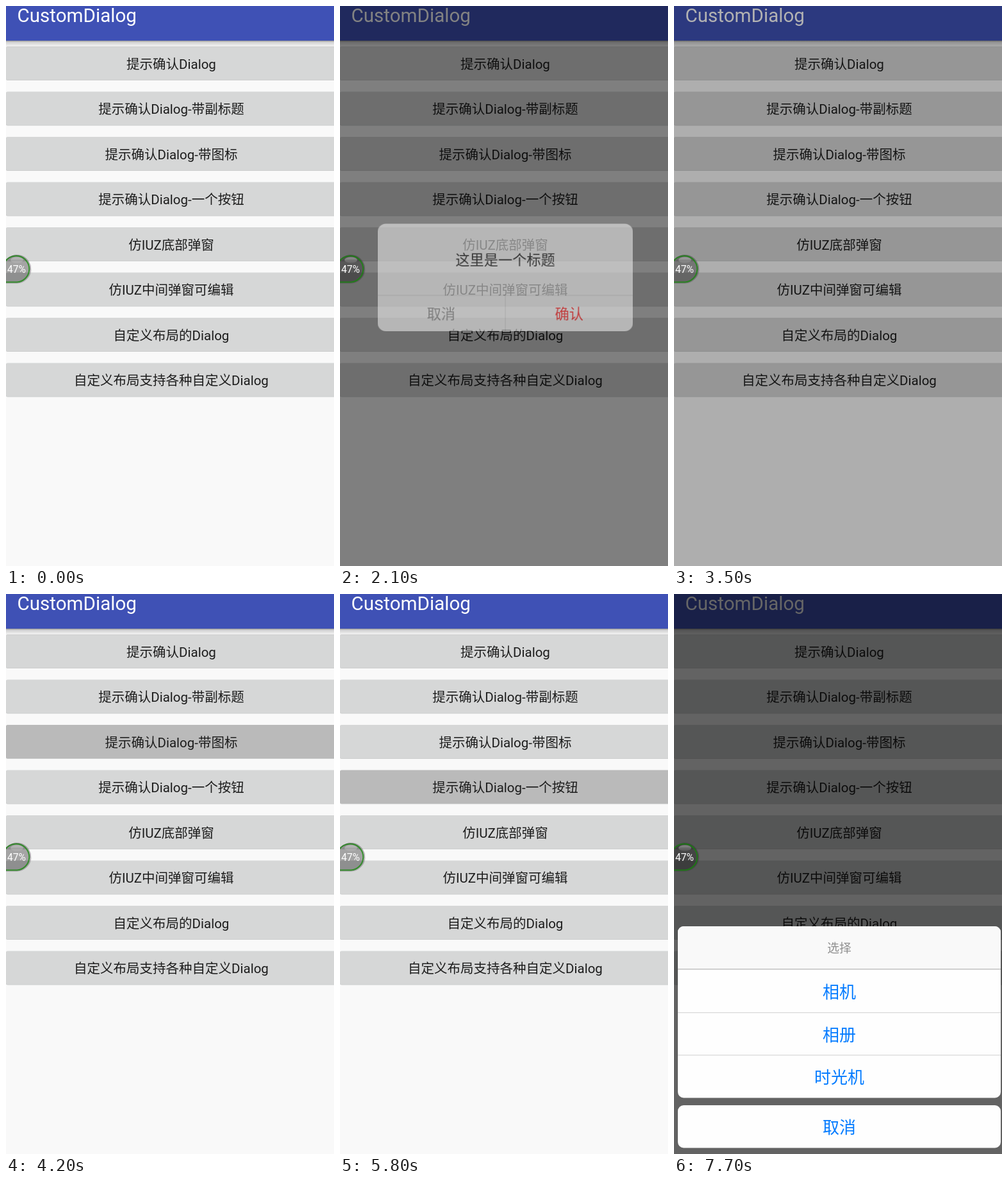
An HTML page that plays this animation: 512 by 873 pixels, repeating every 8 s.

```html
<!DOCTYPE html>
<html lang="zh-CN">
<head>
<meta charset="utf-8">
<title>CustomDialog</title>
<style>
  html, body { margin: 0; width: 100%; height: 100%; overflow: hidden; background: #f9f9f9; }
  svg { display: block; width: 512px; height: 873px; }
  text { font-family: Roboto, "Noto Sans CJK SC", "Noto Sans CJK", sans-serif; }
  .dialog { transform-origin: 258px 423px; }
</style>
</head>
<body>
<svg id="stage" viewBox="0 0 512 873">
  <defs>
    <linearGradient id="shade" x1="0" y1="0" x2="0" y2="1">
      <stop offset="0" stop-opacity=".42"/>
      <stop offset=".2" stop-opacity=".16"/>
      <stop offset=".7" stop-opacity=".05"/>
      <stop offset="1" stop-opacity="0"/>
    </linearGradient>
    <linearGradient id="gloss" x1="0" y1="0" x2="0" y2="1">
      <stop offset="0" stop-color="#fff" stop-opacity=".4"/>
      <stop offset="1" stop-color="#fff" stop-opacity=".08"/>
    </linearGradient>
  </defs>
</svg>
<script>
const LOOP = 8000;
const MID = 258;
const stage = document.getElementById('stage');

function add(parent, tag, attrs, content) {
  const el = document.createElementNS('http://www.w3.org/2000/svg', tag);
  for (const key in attrs) el.setAttribute(key, attrs[key]);
  if (content) el.textContent = content;
  return parent.appendChild(el);
}

function rect(parent, x, y, width, height, fill, rx = 0) {
  return add(parent, 'rect', { x, y, width, height, fill, rx });
}

// Text centred on (x, y)
function label(parent, content, x, y, size, fill) {
  return add(parent, 'text',
    { x, y: y + size * 0.37, 'font-size': size, fill, 'text-anchor': 'middle' }, content);
}

// Held values: rows of [time, css properties]
function track(el, rows) {
  const frames = rows.map(([time, props]) => ({ offset: time / LOOP, easing: 'steps(1)', ...props }));
  frames.push({ ...frames[frames.length - 1], offset: 1 });
  el.animate(frames, { duration: LOOP, iterations: Infinity });
}

// Page
rect(stage, 0, 0, 512, 873, '#f9f9f9');
const buttons = [
  '提示确认Dialog', '提示确认Dialog-带副标题', '提示确认Dialog-带图标', '提示确认Dialog-一个按钮',
  '仿IUZ底部弹窗', '仿IUZ中间弹窗可编辑', '自定义布局的Dialog', '自定义布局支持各种自定义Dialog'
].map((content, i) => {
  const y = 63 + i * 70.5;
  rect(stage, 0, y + 0.6, 516, 52.5, '#c9caca', 2.5);
  const face = rect(stage, 0, y, 516, 52.3, '#d6d7d7', 2.5);
  label(stage, content, MID, y + 27, 20.5, '#1c1c1c');
  return face;
});
rect(stage, 0, 54, 512, 11, 'url(#shade)');
rect(stage, 0, 0, 512, 54, '#3f51b5');
add(stage, 'text', { x: 17.5, y: 25, 'font-size': 29.6, fill: '#fff' }, 'CustomDialog');

for (const [i, time] of [[0, 700], [2, 4200], [3, 5800], [4, 7400]]) {
  track(buttons[i], [[0, { fill: '#d6d7d7' }], [time, { fill: '#bababa' }], [time + 100, { fill: '#d6d7d7' }]]);
}

const dim = rect(stage, 0, 0, 512, 873, '#000');
const dimRows = [[0, { opacity: 0 }]];
const fadeDim = (time, levels) =>
  levels.forEach((opacity, i) => dimRows.push([time + i * 100, { opacity }]));

// Centre dialogs
function dialog({ open, close, quick, title = '#000', subtitle, single }) {
  const g = add(stage, 'g', { class: 'dialog' });
  rect(g, 47, 334.5, 422, 177.5, '#f9f9f9', 14);
  label(g, '这里是一个标题', MID, subtitle ? 378.5 : 394, 23.5, title);
  if (subtitle) label(g, subtitle, MID, 423, 20.5, '#808080');
  rect(g, 47, 452, 422, 1.3, '#dcdcdc');
  if (single) {
    label(g, '取消', MID, 483, 23.5, '#f00');
  } else {
    rect(g, 257.4, 452, 1.3, 60, '#dcdcdc');
    label(g, '取消', 152, 483, 23.5, '#808080');
    label(g, '确认', 363.5, 483, 23.5, '#f00');
  }

  const pose = (opacity, scale) => ({ opacity, transform: `scale(${scale})` });
  const rows = [[0, pose(0, 1)], [open, pose(0.93, 0.99)], [open + 100, pose(1, 1)]];
  if (!quick) rows.push([close, pose(0.52, 0.945)]);
  rows.push([quick ? close : close + 100, pose(0, 0.9)]);
  track(g, rows);
  fadeDim(open, [0.22, 0.47, 0.6]);
  fadeDim(close, quick ? [0.3, 0] : [0.49, 0.2, 0]);
}

dialog({ open: 800, close: 2100 });
dialog({ open: 2900, close: 3500, quick: true, subtitle: '这是一个副标题' });
dialog({ open: 4300, close: 5000 });
dialog({ open: 5900, close: 6700, title: '#7e7488', single: true });

// Bottom sheet
const sheet = add(stage, 'g', {});
rect(sheet, 6, 518, 504, 267.5, '#fefefe', 9);
add(sheet, 'path', { d: 'M6 585V527a9 9 0 0 1 9-9H501a9 9 0 0 1 9 9V585Z', fill: '#f9f9f9' });
label(sheet, '选择', MID, 552, 18.8, '#8f8f8f');
rect(sheet, 6, 584, 504, 1.6, '#c6c6c6');
rect(sheet, 6, 652, 504, 1.2, '#d8d8d8');
rect(sheet, 6, 718.3, 504, 1.2, '#d8d8d8');
rect(sheet, 6, 797, 504, 66.5, '#fefefe', 9);
[['相机', 620], ['相册', 687], ['时光机', 753.5], ['取消', 831]]
  .forEach(([content, y]) => label(sheet, content, MID, y, 26, '#037bff'));
const slide = y => ({ transform: `translateY(${y}px)` });
track(sheet, [[0, slide(360)], [7500, slide(240)], [7600, slide(94)], [7700, slide(0)]]);
fadeDim(7500, [0.22, 0.47, 0.6]);
track(dim, dimRows);

// Floating battery badge
const badge = add(stage, 'g', {});
const outline = r => `M-4 ${410 + r}H17A${r} ${r} 0 1 0 -4 ${410 - r * 0.3}Z`;
add(badge, 'path', { d: outline(21.6), fill: 'rgba(20,20,20,.37)' });
add(badge, 'path', { d: outline(20.6), fill: 'none', stroke: 'rgba(20,140,10,.75)', 'stroke-width': 2 });
add(badge, 'path', { d: outline(22), fill: 'none', stroke: 'rgba(60,60,60,.35)', 'stroke-width': 1 });
add(badge, 'ellipse', { cx: 17, cy: 396, rx: 10, ry: 4.5, fill: 'url(#gloss)' });
label(badge, '47%', 16.5, 410.3, 15.6, '#fff');
</script>
</body>
</html>
```
